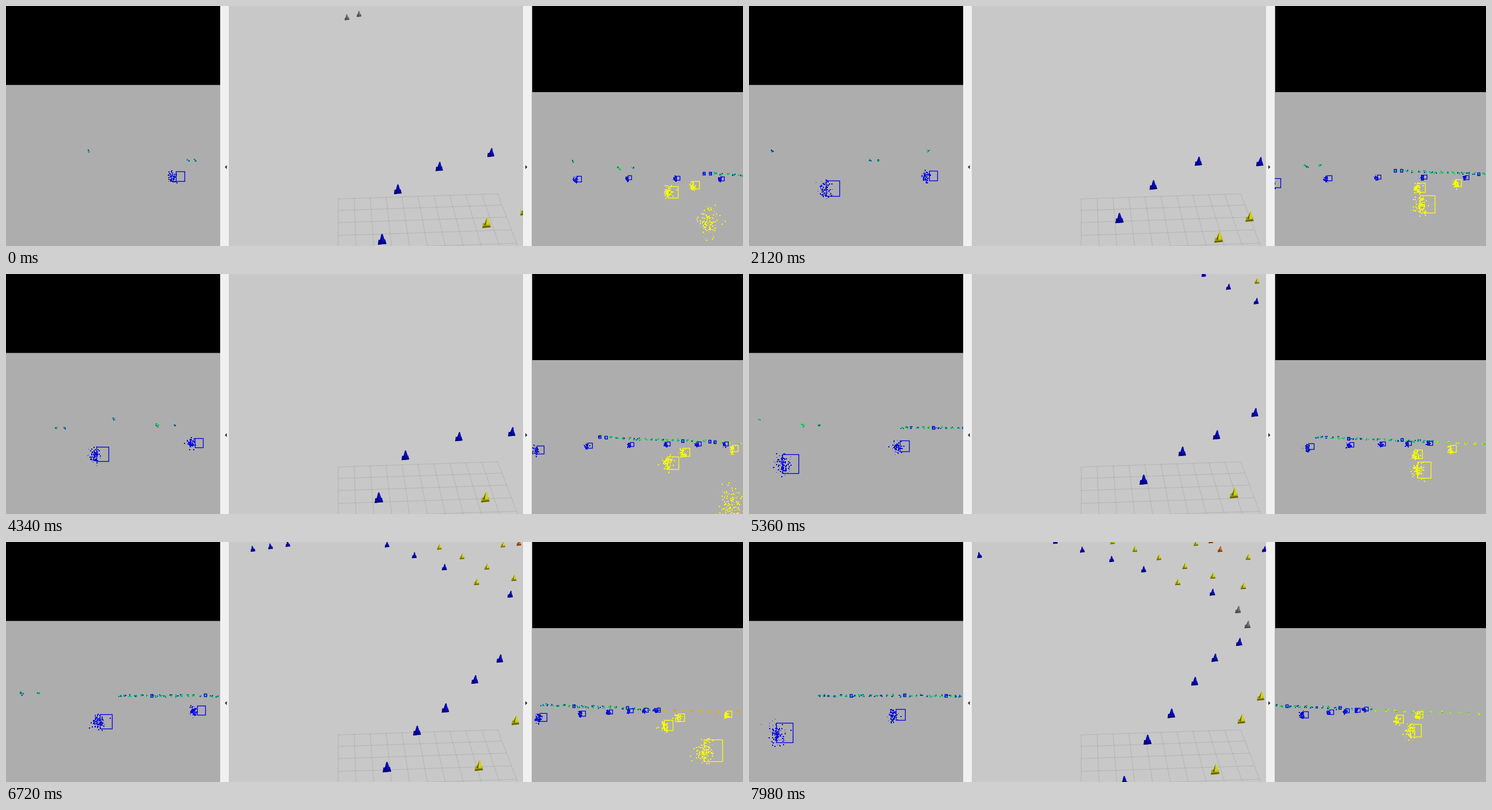
These frames come from a looping animation (1280 px wide and 418 px high, 8 s). An HTML page with a canvas:

```html
<!DOCTYPE html>
<html lang="en">
<head>
<meta charset="utf-8">
<title>Cone detection</title>
<style>
html, body { margin: 0; width: 100%; height: 100%; overflow: hidden; background: #000; }
canvas { display: block; }
</style>
</head>
<body>
<canvas id="stage" width="1280" height="418"></canvas>
<script>
const ctx = document.getElementById('stage').getContext('2d');
const LOOP = 8000, END = 171;
const GROUND = '#adadad', BLUE = '#0000e0', YELLOW = '#ffff00';
const PAINT = {
  blue: ['#0808c4', '#0000a0', '#000070'],
  yellow: ['#d4d400', '#a6a600', '#626200'],
  orange: ['#e06a10', '#b05010', '#783400'],
  grey: ['#747474', '#5c5c5c', '#444444']
};
const GREEN = ['#00e040', '#00d050', '#00a878', '#0040a0'];
const TEAL = ['#00b890', '#0060a0', '#0030b0', '#00d060'];
const LIME = ['#a0f000', '#d8f000', '#40d820'];
const ORANGE = ['#ff9000', '#e0b000', '#c0d000'];

// Car pose in metres and radians at key steps; the far scenery turns with it.
const KEYS = [0, 29, 66, 93, 116, 144, END];
const CAR_X = [0, .03, 1.24, 2.18, 6.1, 7.24, 7.92];
const CAR_Y = [0, .45, 3.5, 4.3, 5.85, 5.68, 5.46];
const YAW = [0, .076, .476, .738, 1.368, 1.595, 1.745];
const FAR = [0, -76, -137, -228, -398, -465, -541];

// Cones on the course, in metres from the start.
const cones = [];
function place(color, points, from = 0, to = END) {
  points.forEach(([x, y]) => cones.push({ color, x, y, from, to }));
}
function run(color, x, y, dx, dy, count) {
  place(color, Array.from({ length: count }, (_, i) => [x + dx * i, y + dy * i]), 110);
}
place('blue', [[-2.5, 1.6], [-1.2, 5.7], [1.8, 7.8], [5.6, 9.1], [9.5, 7.8],
  [12.4, 5.6], [14.4, 3.4], [17.3, .7], [19.7, -1.8], [21.3, -4.5]]);
place('yellow', [[3.7, 2.6], [6.2, 3.5], [9.25, 2.5], [12.9, -.8], [14.75, -3.05]]);
place('grey', [[-4.05, 33.4], [-2.7, 34.2]], 0, 38);
run('blue', 29.7, -5.7, 8.1, -9.3, 2);
run('blue', 36.1, -.9, 3.3, 2.6, 4);
run('blue', 44.1, 15.6, -.5, 1.95, 3);
run('yellow', 30.2, -9, 2.8, 1.9, 6);
run('yellow', 32.5, -3.3, 0, 0, 1);
run('yellow', 36.3, -12.4, 5, 3.9, 2);
run('orange', 39, -10.4, 2.6, 0, 2);
run('grey', 23.6, -6.3, 2.5, -.3, 2);

function rng(seed) {
  let s = Math.imul(seed + 1, 2654435761);
  return () => {
    s = s + 0x6D2B79F5 | 0;
    let t = Math.imul(s ^ s >>> 15, 1 | s);
    t = t + Math.imul(t ^ t >>> 7, 61 | t) ^ t;
    return ((t ^ t >>> 14) >>> 0) / 4294967296;
  };
}

function keyed(values, n) {
  let k = 0;
  while (k < KEYS.length - 2 && n >= KEYS[k + 1]) k++;
  return values[k] + (values[k + 1] - values[k]) * (n - KEYS[k]) / (KEYS[k + 1] - KEYS[k]);
}

// Grid column and row to the stage; the car stands at 5, 5.
function project(i, j) {
  const w = 1 - .0265 * j;
  return [(577 + 27.7 * i - 15.3 * j) / w, (336 - .9 * i + 10.6 * j) / w];
}

function poly(color, ...p) {
  ctx.fillStyle = color;
  ctx.beginPath();
  for (let i = 0; i < p.length; i += 2) ctx.lineTo(p[i], p[i + 1]);
  ctx.fill();
}

function line(from, to) {
  ctx.beginPath();
  ctx.moveTo(...from);
  ctx.lineTo(...to);
  ctx.stroke();
}

function dot(x, y, color, size = 2) {
  ctx.fillStyle = color;
  ctx.fillRect(Math.round(x), Math.round(y), size, size);
}

function box(x, y, w, h, color) {
  ctx.strokeStyle = color;
  ctx.lineWidth = 1.3;
  ctx.strokeRect(Math.round(x - w / 2) + .5, Math.round(y - h / 2) + .5, Math.round(w), Math.round(h));
}

function panel(x, w, draw) {
  ctx.save();
  ctx.beginPath();
  ctx.rect(x, 0, w, 418);
  ctx.clip();
  draw();
  ctx.restore();
}

function cone(x, y, [light, mid, dark]) {
  const w = 8 + Math.max(y, 0) * .017, h = w * 1.25, tip = x + (x - 650) * .0008 * w;
  const px = f => x + f * w, py = f => y + f * h;
  poly(mid, px(-.42), py(.04), px(.38), py(0), px(.5), py(.42), px(-.48), py(.5));
  poly(dark, px(-.46), py(.34), px(.48), py(.28), px(.5), py(.42), px(-.48), py(.5));
  poly(light, px(-.26), py(.22), tip - w * .07, py(-.5), tip + w * .07, py(-.5), px(.36), py(.18));
  poly(dark, px(-.28), py(.22), tip - w * .07, py(-.5), px(-.06), py(.24));
}

// Laser returns around a cone, with the detected box beside them.
function cluster(x, y, w, dx, color, seed) {
  const r = rng(seed), h = w * 1.18;
  const spread = () => (r() + r() + r() - 1.5) * 2;
  for (let i = 25 + w * 3; i > 0; i--) {
    const tail = r() < .1 ? 1.8 : 1;
    dot(x - 1 + spread() * w * .22 * tail, y + spread() * h * .28, color, r() < .6 ? 2 : 1);
  }
  if (w < 22) dot(x, y, color === YELLOW ? '#50e000' : '#0060a0');
  if (w < 36) box(x + dx, y - 1, w, h, color);
}

function clump(x, y, seed, tones) {
  const r = rng(seed);
  for (let i = 0; i < 6; i++) dot(x - 3 + r() * 5, y - 2 + r() * 3.5, tones[Math.floor(r() * tones.length)]);
}

function row(x0, y0, slope, end, n) {
  for (let i = 0, d = 0; x0 + d < end + 8; i++) {
    const r = rng(i + 400), x = x0 + d, y = y0 + d * slope + r() * 2 - 1, far = slope && d > 205;
    const tones = far ? (Math.abs(n - 144) < 14 ? ORANGE : LIME) : n > 105 && r() < .5 ? TEAL : GREEN;
    clump(x, y, i * 71 + n, tones);
    if (!far && r() < .15) box(x, y, 4, 5, BLUE);
    d += (far ? 14 : 6.5) + r() * 5;
  }
}

function leftView(n) {
  const far = keyed(FAR, n), phase = .55 + .019 * n;
  ctx.fillStyle = GROUND;
  ctx.fillRect(0, 0, 372, 418);
  ctx.fillStyle = '#000';
  ctx.fillRect(0, 0, 372, 137.5);
  [[143, 252], [315, 268], [328, 268], [415, 252], [490, 262], [492, 265], [520, 263]]
    .forEach(([x, y], i) => clump(x + far, y, i * 53 + n, i > 2 ? GREEN : TEAL));
  row(663 + far, 267, 0, 372, n);
  for (let k = 0; k < 6; k++) {
    const u = phase - k;
    if (u < -.4 || u > 2.2) continue;
    const x = 360 - 110 * u - 35 * u * u;
    const near = Math.max(0, (360 - x) / 340) ** 1.5;
    cluster(x, 293 + 46 * near, 13 + 18 * near, 13, BLUE, k * 977 + n * 31);
  }
}

function rightView(n) {
  const late = n / END;
  ctx.fillStyle = GROUND;
  ctx.fillRect(913, 0, 367, 418);
  ctx.fillStyle = '#000';
  ctx.fillRect(914, 0, 366, 150);
  [[984, 270], [1062, 281], [1065, 283], [1088, 281]]
    .forEach(([x, y], i) => clump(x - 2.1 * n, y - n * .09, i * 53 + n, i ? GREEN : TEAL));
  row(1212 - 1.95 * n, 283 + 8 * (1 - late) ** 3, .04, 1280, n);

  // Outer cones bunch up toward the right as the bend tightens.
  const bunch = .04 + .36 * late ** 3;
  for (let k = 0; k < 9; k++) {
    const v = k + .87 - .0185 * n;
    if (v < -.2 || v > 5.4) continue;
    const x = 905 + 100 * v / (1 + bunch * v);
    const y = 297 + 12 * Math.exp(-1.2 * v) + (1 - n / 80) * v;
    const w = 5.5 + 8 * Math.exp(-1.2 * v);
    cluster(x, y, w, w * .7, BLUE, k * 977 + n * 31 + 7);
  }
  // Inner cones drift left, then sweep back to the right as they pass.
  for (let k = -1; k < 6; k++) {
    const v = k + .2 - .0128 * n;
    if (v < -1.4 || v > 2.9) continue;
    const x = 1150 + (v < 0 ? 110 : 30) * v * v - 55 * v * late ** 4;
    const w = 9 + 10 * Math.exp(-1.3 * v);
    cluster(x, 308 + 22 * Math.exp(-1.4 * v) - 4 * v * late, w, w * .45, YELLOW, (k + 2) * 977 + n * 31 + 13);
  }
}

function grid() {
  ctx.strokeStyle = 'rgba(120,120,110,.5)';
  ctx.lineWidth = .8;
  ctx.setLineDash([2, 1]);
  for (let i = 0; i <= 10; i++) {
    line(project(i, 0), project(i, 10));
    line(project(0, i), project(10, i));
  }
  ctx.setLineDash([]);
}

function mainView(n) {
  ctx.fillStyle = '#c8c8c8';
  ctx.fillRect(387, 0, 511, 418);
  grid();
  const cx = keyed(CAR_X, n), cy = keyed(CAR_Y, n), yaw = keyed(YAW, n);
  const c = Math.cos(yaw), s = Math.sin(yaw);
  cones.filter(p => n >= p.from && n <= p.to)
    .map(p => {
      const dx = p.x - cx, dy = p.y - cy;
      return { color: p.color, at: project(5 + dx * c - dy * s, 5 - dx * s - dy * c) };
    })
    .filter(p => p.at[1] > -20 && p.at[1] < 450)
    .sort((a, b) => a.at[1] - b.at[1])
    .forEach(p => cone(...p.at, PAINT[p.color]));
}

function draw(n) {
  panel(0, 372, () => leftView(n));
  panel(913, 367, () => rightView(n));
  panel(387, 511, () => mainView(n));
  ctx.fillStyle = '#f0f0f0';
  ctx.fillRect(372, 0, 15, 418);
  ctx.fillRect(898, 0, 15, 418);
  poly('#303030', 383.5, 277, 383.5, 284, 380, 280.5);
  poly('#303030', 902, 277, 902, 284, 905.5, 280.5);
}

// Three steps in every 140 ms: two of 20 ms, then one of 100 ms.
function stepAt(t) {
  return Math.floor(t / 140) * 3 + Math.min(2, Math.floor(t % 140 / 20));
}

let shown = -1;
const start = performance.now();
function tick() {
  const n = stepAt((performance.now() - start) % LOOP);
  if (n !== shown) draw(shown = n);
  requestAnimationFrame(tick);
}
tick();
</script>
</body>
</html>
```
